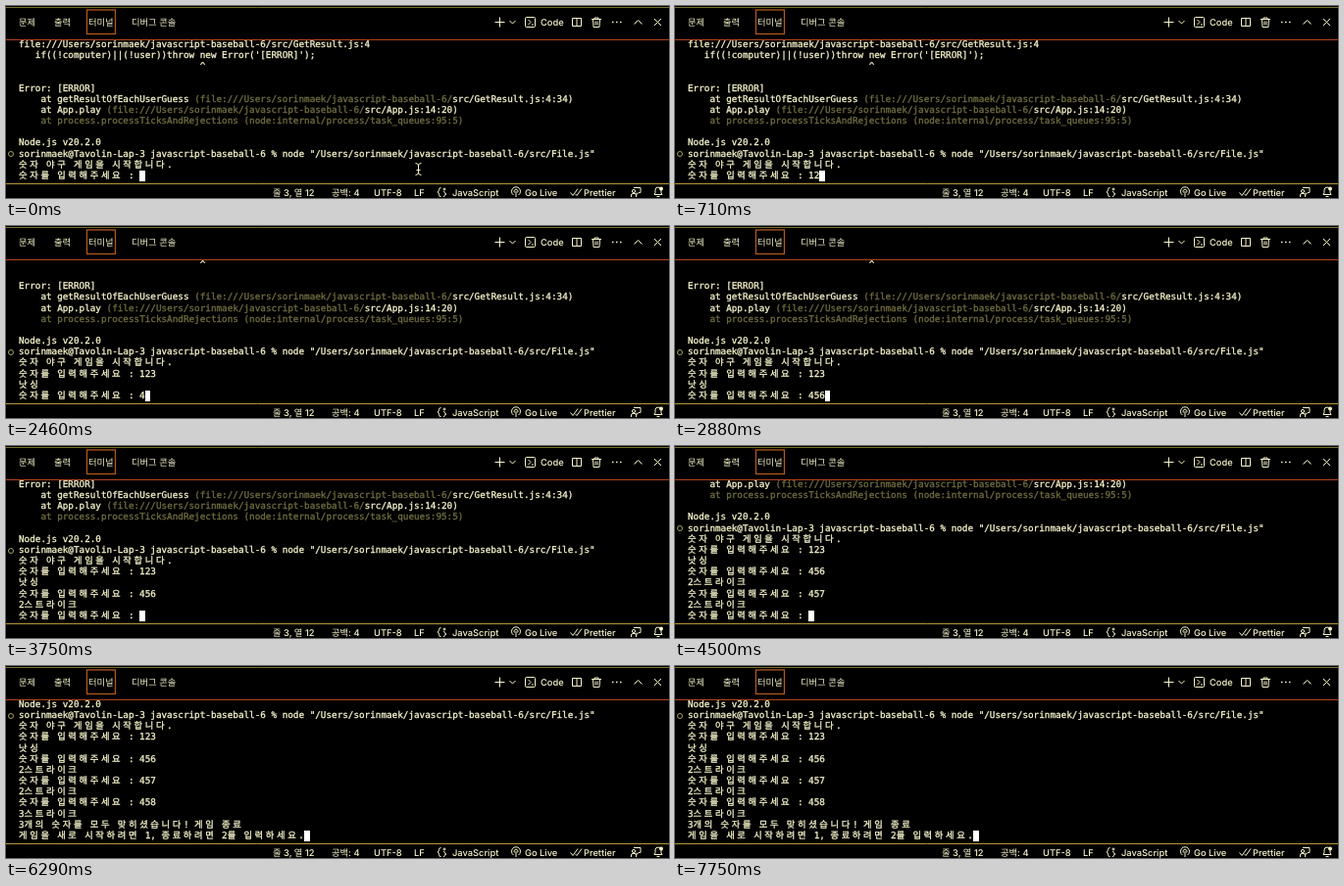
Animation, 676 px wide and 196 px high, one loop 8 s. Source, as an HTML page:

```html
<!DOCTYPE html>
<html lang="ko">
<head>
<meta charset="utf-8">
<title>Terminal</title>
<style>
  html, body { margin: 0; width: 100%; height: 100%; overflow: hidden; background: #000; }
  #stage {
    --ink: #f8f5cc;
    position: relative; width: 676px; height: 196px; overflow: hidden;
    background: #000; color: var(--ink); text-rendering: geometricPrecision;
  }
  #screen {
    position: absolute; left: 0; top: 33.8px; width: 676px; height: 146px; overflow: hidden;
    font: 9.3px/11.2px "DejaVu Sans Mono", "Noto Sans CJK KR", "Noto Sans CJK", monospace;
    -webkit-text-stroke: 0.3px;
  }
  .row { position: relative; height: 11.2px; padding-left: 13px; white-space: pre; }
  .wide { display: inline-block; width: 11.2px; height: 11.2px; vertical-align: top; }
  .dim { color: #716e42; }
  .cursor { display: inline-block; width: 5.6px; height: 11.2px; vertical-align: top; background: #fff; }
  .ring {
    position: absolute; left: 2px; top: 2.6px; width: 4px; height: 4px;
    border: 1px solid #a8a460; border-radius: 50%;
  }
  svg { position: absolute; left: 0; top: 0; }
  svg text { font: 500 9.3px Inter, "Noto Sans CJK KR", "Noto Sans CJK", sans-serif; fill: var(--ink); }
  .icons { fill: none; stroke: var(--ink); stroke-width: 1; }
</style>
</head>
<body>
<div id="stage">
  <div id="screen"></div>
  <svg width="676" height="196" viewBox="0 0 676 196">
    <path d="M0 1.5H676" stroke="#75702a"/>
    <path d="M0 34.5H676" stroke="#b0441c"/>
    <path d="M0 181.5H676" stroke="#b8963a"/>
    <rect x="82.5" y="4" width="29" height="24.5" fill="none" stroke="#b0581c" stroke-width="1.3"/>
    <g id="labels"></g>
    <g class="icons">
      <!-- panel actions -->
      <path d="M503.5 11.5v10M498.5 16.5h10M513.5 15l3 3 3-3"/>
      <rect x="529.5" y="11.5" width="10" height="10" rx="1"/>
      <path d="M532.5 14l2.5 2.5-2.5 2.5M536 19h2"/>
      <path d="M577.5 12.5h9v8h-9zM582 12.5v8"/>
      <path d="M597 13.5h10M600 13.5v-1.5h4v1.5M598.5 13.5l.5 8h6l.5-8M601 15.5v4M603 15.5v4"/>
      <path d="M618 16.5h1.5M622 16.5h1.5M626 16.5h1.5" stroke-width="1.5"/>
      <path d="M640.5 18.5l4-4 4 4M661 13l7 7M668 13l-7 7"/>
      <!-- status bar -->
      <path d="M443.5 185.5q-2 0-2 2t-1.5 2.5q1.5 0 1.5 2.5t2 2M446 189.5q1.5 0 1.5 1.2t1.5 1.3q-1.5 0-1.5 1.3t-1.5 1.2"/>
      <circle cx="447" cy="187" r="1"/>
      <path d="M517.5 193a4.5 4.5 0 1 1 5 0M518.5 190.5a2 2 0 1 1 3 0M520 189v6"/>
      <path d="M575.5 190.5l2.5 3 5-7M580.5 192l1.5 1.5 5-7"/>
      <path d="M640 185.5h7v5h-2l-2 2v-2M637.5 195v-2q0-1.5 1.5-1.5h2q1.5 0 1.5 1.5v2"/>
      <circle cx="640" cy="189" r="1.6"/>
      <path d="M661 192.5l1-2v-2.5a3 3 0 0 1 6 0v2.5l1 2zM663.5 194.5h3"/>
      <circle cx="668" cy="186.5" r="2" fill="#f8f5cc" stroke="none"/>
    </g>
    <path id="pointer" class="icons" d="M417.5 160.5q3 0 3 2.5v7q0 2.5-3 2.5M423.5 160.5q-3 0-3 2.5v7q0 2.5 3 2.5M418.5 167.5h4"/>
  </svg>
</div>
<script>
  const LOOP = 8000, ROWS = 13, POINTER_HIDES = 350;
  const user = "sorinmaek", host = "Tavolin-Lap-3", project = "javascript-baseball-6";
  const root = `/Users/${user}/${project}/`;
  const ask = "숫자를 입력해주세요 : ";

  // The marks ‹ › enclose dimmed text.
  const history = [
    `file://${root}src/GetResult.js:4`,
    "   if((!computer)||(!user))throw new Error('[ERROR]');",
    " ".repeat(33) + "^",
    "",
    "Error: [ERROR]",
    `    at getResultOfEachUserGuess ‹(file://${root}›src/GetResult.js:4:34)`,
    `    at App.play ‹(file://${root}›src/App.js:14:20)`,
    "‹    at process.processTicksAndRejections (node:internal/process/task_queues:95:5)›",
    "",
    "Node.js v20.2.0",
    `${user}@${host} ${project} % node "${root}src/File.js"`,
    "숫자 야구 게임을 시작합니다.",
    ask
  ].join("\n");

  // Output appended at each time in ms
  const output = [
    [0, history],
    [350, "1"], [560, "2"], [880, "3"], [2040, "\n낫싱\n" + ask],
    [2420, "4"], [2600, "5"], [2800, "6"], [3400, "\n2스트라이크\n" + ask],
    [3850, "4"], [3960, "5"], [4090, "7"], [4380, "\n2스트라이크\n" + ask],
    [4700, "4"], [4850, "5"], [5100, "8"],
    [6210, "\n3스트라이크\n3개의 숫자를 모두 맞히셨습니다! 게임 종료\n" +
           "게임을 새로 시작하려면 1, 종료하려면 2를 입력하세요."]
  ];

  const tabs = [[13, "문제"], [49, "출력"], [84, "터미널"], [128, "디버그 콘솔"], [545, "Code"]];
  const status = [
    [272, "줄 3, 열 12"], [332, "공백: 4"], [375, "UTF-8"], [416, "LF"],
    [455, "JavaScript"], [529, "Go Live"], [589, "Prettier"]
  ];
  const labelRow = (labels, y) =>
    labels.map(([x, text]) => `<text x="${x}" y="${y}">${text}</text>`).join("");
  document.getElementById("labels").innerHTML = labelRow(tabs, 20) + labelRow(status, 193.5);

  const screen = document.getElementById("screen");
  const pointer = document.getElementById("pointer");

  function rowHtml(line, index, rows) {
    const ring = line.startsWith(user) ? '<span class="ring"></span>' : "";
    const cursor = index === rows.length - 1 ? '<span class="cursor"></span>' : "";
    const text = line
      .replace(/[가-힣]/g, '<span class="wide">$&</span>')
      .replace("‹", '<span class="dim">')
      .replace("›", "</span>");
    return `<div class="row">${ring}${text}${cursor}</div>`;
  }

  let shown = -1;
  function draw(now) {
    const time = now % LOOP;
    const count = output.filter(([start]) => start <= time).length;
    if (count !== shown) {
      shown = count;
      const stream = output.slice(0, count).map(([, text]) => text).join("");
      screen.innerHTML = stream.split("\n").slice(-ROWS).map(rowHtml).join("");
    }
    pointer.style.display = time < POINTER_HIDES ? "" : "none";
  }

  const begin = performance.now();
  function tick() {
    draw(performance.now() - begin);
    requestAnimationFrame(tick);
  }
  tick();
</script>
</body>
</html>
```
